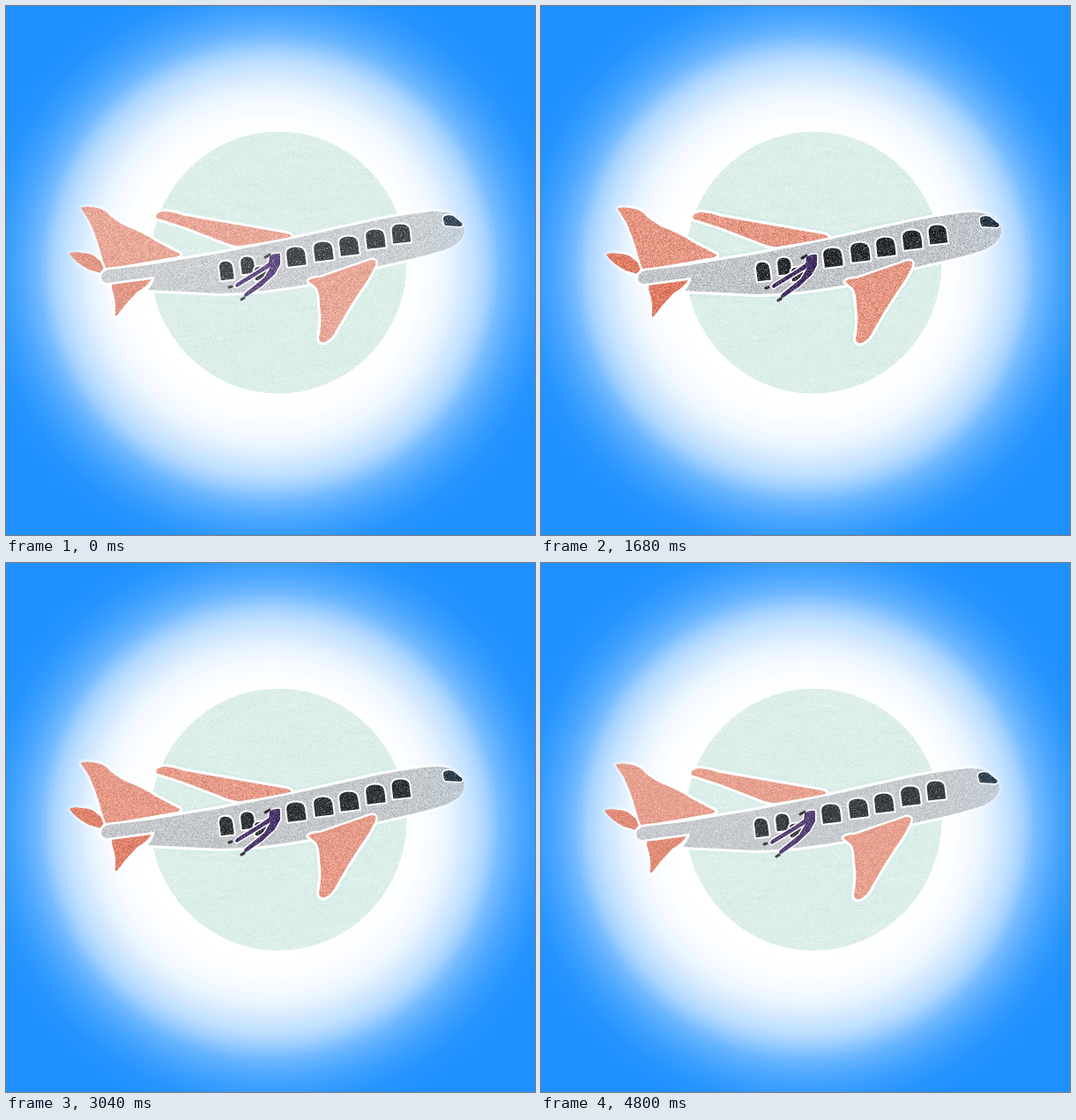
An HTML page with a canvas that plays this animation: 600 px wide and 600 px high, repeating every 4.88 s.

```html
<!DOCTYPE html>
<html lang="en">
<head>
<meta charset="utf-8">
<title>Crayon plane</title>
<style>
html, body { margin: 0; width: 100%; height: 100%; overflow: hidden; background: #1e90ff; }
canvas { display: block; width: 600px; height: 600px; }
</style>
</head>
<body>
<canvas id="stage" width="600" height="600"></canvas>
<script>
const SIZE = 600, STEP = 80, STEPS = 61;
const ctx = document.getElementById('stage').getContext('2d');

const parts = {
  farWing: 'M170 238Q172 233 181 233Q192 234 203 238L318 258Q326 260 322 263L266 272Q257 272 248 268L204 251L176 242Q170 241 170 238Z',
  smallFin: 'M72 281Q76 278 86 280Q97 280 103 286Q109 291 111 296L108 303L94 299Q80 292 72 281Z',
  topFin: 'M85 229Q88 226 103 229Q113 231 118 238Q128 247 146 254Q160 260 170 267L197 281Q198 284 188 285L114 298Q111 293 108 282Q103 262 94 243Z',
  body: 'M108 308Q108 301 117 299L160 294L240 281L325 264L420 243Q465 234 485 233Q502 232 511 239Q521 247 520 257Q517 268 502 275Q480 283 418 296L345 315Q290 325 245 326L161 322Q167 315 169 307L116 314Q108 314 108 308Z',
  lowFin: 'M120 316L165 310Q160 318 149 324Q136 337 126 351Q123 353 124 346Q125 334 120 320Z',
  nearWing: 'M343 312Q345 308 356 308L414 288Q421 287 419 294Q412 309 401 324Q388 343 376 365Q370 378 362 381Q355 383 355 376Q359 357 356 340Q356 323 351 318Z'
};
const legs = 'M299 284Q304 280 311 281L311 293L305 304L290 318L272 330Q268 329 272 325L293 308L300 296L262 319Q258 318 262 314L288 298L298 291Z';
const shoes = ['M253 319L256 318', 'M267 333L270 331', 'M294 285L299 282'];
const cockpit = 'M496 240Q499 236 507 238L517 246Q519 250 514 250L498 249Q496 246 496 240Z';
// centre x, centre y, width, height
const windows = [
  [250, 300, 15, 21], [274, 294, 15, 19], [289, 303, 14, 15], [329, 284, 21, 21],
  [360, 278, 21, 21], [389, 272, 21, 21], [419, 264, 21, 21], [448, 258, 20, 21]
];

// step, x, y
const poses = [
  [0, 0, 0], [2, -2, -4], [4, 3, 2], [6, 6, -1], [8, 1, 3], [10, 4, -1], [12, 5, -3],
  [14, 2, 2], [16, 3, 4], [18, 1, -2], [21, 2, 1], [23, -3, 3], [26, 0, -2], [28, 4, -1],
  [30, 3, 3], [32, 7, -5], [35, 3, 2], [38, 0, -2], [40, -1, 3], [42, 3, -3], [44, -2, 4],
  [46, 3, -2], [49, 0, 3], [51, 1, 1], [53, 3, 8], [55, 0, 3], [57, 5, 7], [59, -1, 3], [60, 0, 0]
];
// step, crayon pressure
const pressure = [[0, 0], [10, 1], [21, 0.85], [26, 0.7], [38, 0.65], [46, 0.75], [60, 0.35]];

const soft = {
  coral: '#e8a696', red: '#e29684', grey: '#cbced1', nose: '#c3cfda',
  dark: '#46494c', violet: '#604a80', navy: '#3a4a5a', grain: 26, fleck: 0.08
};
const bold = {
  coral: '#e5917d', red: '#dc7259', grey: '#bdc1c5', nose: '#b7c3cf',
  dark: '#212427', violet: '#3a2458', navy: '#22303e', grain: 42, fleck: 0.13
};

function random(seed) {
  return () => {
    seed = (seed + 0x6d2b79f5) | 0;
    let t = Math.imul(seed ^ (seed >>> 15), 1 | seed);
    t ^= t + Math.imul(t ^ (t >>> 7), 61 | t);
    return ((t ^ (t >>> 14)) >>> 0) / 4294967296;
  };
}

function layer() {
  const c = document.createElement('canvas');
  c.width = c.height = SIZE;
  const g = c.getContext('2d', { willReadFrequently: true });
  g.lineJoin = g.lineCap = 'round';
  return g;
}

function ellipse(g, x, y, rx, ry) {
  g.beginPath();
  g.ellipse(x, y, rx, ry, 0, 0, Math.PI * 2);
}

function addStops(gradient, stops, span) {
  for (const [at, color] of stops) gradient.addColorStop(at / span, color);
  return gradient;
}

// Paper tooth: random tone shifts plus pale flecks.
function grain(g, amount, fleck, seed) {
  const img = g.getImageData(0, 0, SIZE, SIZE), d = img.data, rnd = random(seed);
  for (let i = 0; i < d.length; i += 4) {
    if (!d[i + 3]) continue;
    const shift = (rnd() + rnd() - 1) * amount;
    const pale = rnd() < fleck ? 0.35 * rnd() + 0.1 : 0;
    for (let k = 0; k < 3; k++) {
      const v = d[i + k] + shift;
      d[i + k] = v + (255 - v) * pale;
    }
  }
  g.putImageData(img, 0, 0);
}

function arch(w, h) {
  const p = new Path2D(), x = w / 2, y = h / 2;
  p.moveTo(-x, y);
  p.lineTo(-x, -y * 0.3);
  p.quadraticCurveTo(-x, -y, -x * 0.2, -y);
  p.quadraticCurveTo(x, -y, x, -y * 0.2);
  p.lineTo(x, y);
  p.closePath();
  return p;
}

function outline(color, width) {
  const g = layer();
  g.strokeStyle = color;
  g.lineWidth = width;
  for (const d of Object.values(parts)) g.stroke(new Path2D(d));
  return g;
}

// White rim that fades out towards nose and tail.
function rim() {
  const g = outline('#fff', 6);
  g.globalCompositeOperation = 'destination-in';
  g.fillStyle = addStops(g.createLinearGradient(0, 0, SIZE, 0), [
    [70, '#fff2'], [150, '#fff'], [450, '#fff'], [510, '#fff2']
  ], SIZE);
  g.fillRect(0, 0, SIZE, SIZE);
  return g.canvas;
}

function plane(look) {
  const ink = layer(), paper = layer();

  const fill = (path, color, gap) => {
    ink.globalCompositeOperation = 'destination-out';
    ink.lineWidth = gap;
    ink.stroke(path);
    ink.globalCompositeOperation = 'source-over';
    ink.fillStyle = color;
    ink.fill(path);
  };
  const hull = ink.createLinearGradient(465, 0, 522, 0);
  hull.addColorStop(0, look.grey);
  hull.addColorStop(1, look.nose);
  const tones = { body: hull, smallFin: look.red, lowFin: look.red };
  for (const [name, d] of Object.entries(parts)) {
    fill(new Path2D(d), tones[name] || look.coral, 5);
  }
  for (const [x, y, w, h] of windows) {
    ink.save();
    ink.translate(x, y);
    ink.rotate(-0.12);
    fill(arch(w, h), look.dark, 4);
    ink.restore();
  }
  fill(new Path2D(cockpit), look.navy, 3);
  fill(new Path2D(legs), look.violet, 3);
  ink.strokeStyle = look.dark;
  ink.lineWidth = 3;
  for (const d of shoes) ink.stroke(new Path2D(d));
  grain(ink, look.grain, look.fleck, 11);

  // White paper shows wherever the ink leaves a gap.
  paper.fillStyle = '#fff';
  for (const d of Object.values(parts)) paper.fill(new Path2D(d));
  paper.drawImage(rim(), 0, 0);
  paper.drawImage(ink.canvas, 0, 0);
  return paper.canvas;
}

function backdrop() {
  const g = layer(), reach = 345;
  g.fillStyle = addStops(g.createRadialGradient(300, 298, 0, 300, 298, reach), [
    [150, '#fff'], [172, '#fbfdff'], [190, '#f1f8ff'], [205, '#e2f0ff'], [220, '#cbe5ff'],
    [234, '#b2d9ff'], [246, '#98ccff'], [258, '#7cbeff'], [270, '#65b3ff'], [284, '#4da7ff'],
    [300, '#389dff'], [320, '#2694ff'], [reach, '#1e90ff']
  ], reach);
  g.fillRect(0, 0, SIZE, SIZE);

  // Faint stacked discs leave stepped edges in the glow.
  g.fillStyle = 'rgba(255,255,255,0.05)';
  for (const r of [0, 9, 18]) {
    ellipse(g, 299, 298, 248 + r * 0.6, 244 + r);
    g.fill();
  }

  const disc = layer(), rnd = random(5);
  ellipse(disc, 309, 291, 145.5, 148.5);
  disc.fillStyle = '#dbeeea';
  disc.fill();
  disc.clip();
  disc.lineWidth = 1.5;
  for (let i = 0; i < 240; i++) {
    const x = 150 + rnd() * 300, y = 140 + rnd() * 300, w = 15 + rnd() * 40;
    disc.strokeStyle = rnd() < 0.5 ? 'rgba(255,255,255,0.12)' : 'rgba(190,225,215,0.12)';
    disc.beginPath();
    disc.moveTo(x, y);
    disc.quadraticCurveTo(x + w / 2, y - 8, x + w, y - 4 + rnd() * 8);
    disc.stroke();
  }
  grain(disc, 8, 0.06, 23);
  g.drawImage(disc.canvas, 0, 0);
  return g.canvas;
}

function sample(keys, step, k) {
  let i = 0;
  while (i < keys.length - 2 && keys[i + 1][0] <= step) i++;
  const a = keys[i], b = keys[i + 1];
  const u = (step - a[0]) / (b[0] - a[0]);
  return a[k] + (b[k] - a[k]) * u;
}

const sky = backdrop(), pale = plane(soft), strong = plane(bold);
const fringe = outline('#c8e6de', 11);
grain(fringe, 26, 0.5, 31);

function draw(ms) {
  const step = Math.floor(ms / STEP) % STEPS;
  const x = Math.round(sample(poses, step, 1)), y = Math.round(sample(poses, step, 2));
  const press = sample(pressure, step, 1);
  ctx.globalAlpha = 1;
  ctx.drawImage(sky, 0, 0);

  ctx.save();
  ellipse(ctx, 309, 291, 145, 148);
  ctx.clip();
  ctx.globalAlpha = press * 0.7;
  ctx.drawImage(fringe.canvas, x, y);
  ctx.restore();

  ctx.drawImage(pale, x, y);
  ctx.globalAlpha = press;
  ctx.drawImage(strong, x, y);
}

let start;
function tick(now) {
  if (start === undefined) start = now;
  draw(Math.max(0, now - start));
  requestAnimationFrame(tick);
}
draw(0);
requestAnimationFrame(tick);
</script>
</body>
</html>
```
